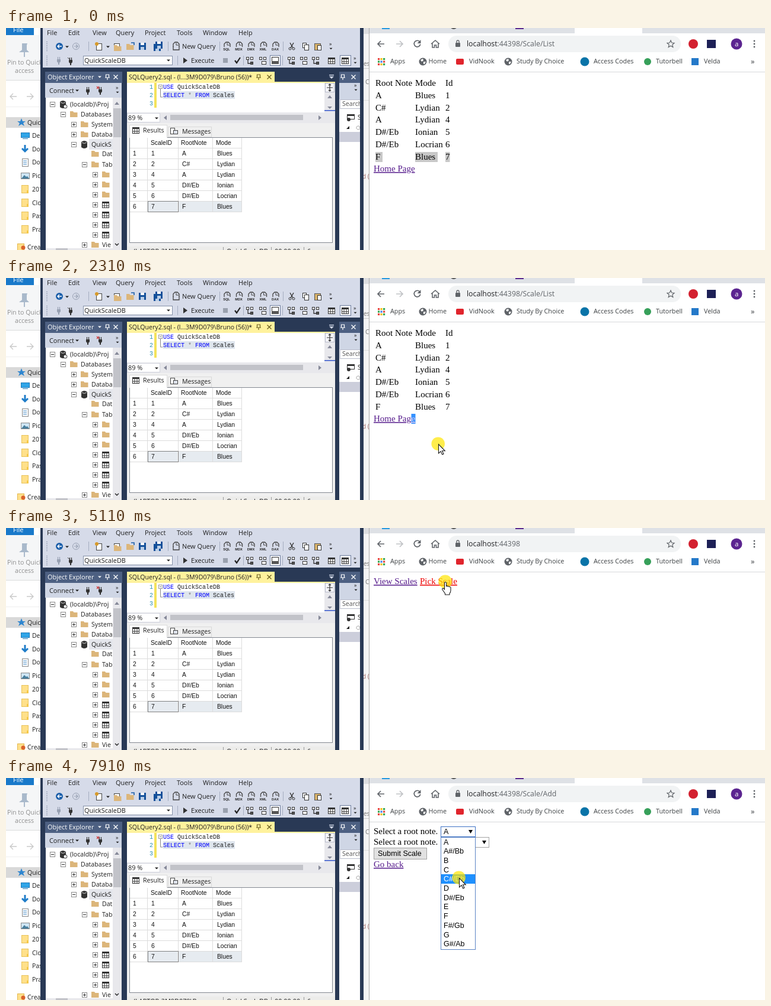
An HTML page that plays this animation: 1280x376 px, repeating every 8 s.

```html
<!DOCTYPE html>
<html lang="en">
<head>
<meta charset="utf-8">
<title>Scale list</title>
<style>
html, body { margin: 0; width: 100%; height: 100%; overflow: hidden; background: #fff; }
svg { display: block; width: 100vw; height: 100vh; }
text { white-space: pre; }
</style>
</head>
<body>
<svg id="stage" viewBox="0 0 1280 376" xmlns="http://www.w3.org/2000/svg"><g id="desk"></g><g id="live"></g></svg>
<script>
const UI = "'Open Sans', sans-serif", ARIAL = "'Liberation Sans', sans-serif";
const TIMES = "'Liberation Serif', serif", MONO = "'Liberation Mono', monospace";
const NAVY = '#293955', BAR = '#d6dbe9', INK = '#1e1e1e', LINK = '#551a8b', BLUE = '#1e90ff';

const rect = (x, y, w, h, fill, more = '') => `<rect x="${x}" y="${y}" width="${w}" height="${h}" fill="${fill}" ${more}/>`;
const box = (x, y, w, h, fill, edge, more = '') => rect(x + .5, y + .5, w - 1, h - 1, fill, `stroke="${edge}" ${more}`);
const disc = (x, y, r, fill, more = '') => `<circle cx="${x}" cy="${y}" r="${r}" fill="${fill}" ${more}/>`;
const fill = (d, c = INK, more = '') => `<path d="${d}" fill="${c}" ${more}/>`;
const line = (d, c = INK, w = 1, more = '') => `<path d="${d}" fill="none" stroke="${c}" stroke-width="${w}" ${more}/>`;
const text = (x, y, s, c = INK, size = 10.9, font = UI, more = '') =>
  `<text x="${x}" y="${y}" fill="${c}" font-size="${size}" font-family="${font}" ${more}>${s}</text>`;
const down = (x, y, c = INK, r = 3) => fill(`M${x - r} ${y - r / 2}h${2 * r}l${-r} ${r}z`, c);
const up = (x, y, c) => fill(`M${x - 4} ${y + 2}h8l-4-5z`, c);
const cross = (x, y, c, r = 3.5, w = 1.4) => line(`M${x - r} ${y - r}l${2 * r} ${2 * r}m0 ${-2 * r}l${-2 * r} ${2 * r}`, c, w);
const folder = (x, y, c = '#dcb67a') => fill(`M${x - 6} ${y - 5}h5l1.5 2h6v8h-12.5z`, c);
const pin = (x, y, c) => line(`M${x - 2.5} ${y - 4}h5v5h-5zM${x - 4} ${y + 1}h8M${x} ${y + 1}v4`, c, 1.2);
const grid = (x, y) => box(x - 6, y - 5, 12, 11, '#fff', '#333') + rect(x - 6, y - 5, 12, 3, '#333') +
  line(`M${x - 6} ${y + 2}h12M${x - 2} ${y - 3}v9M${x + 2} ${y - 3}v9`, '#333');
const plug = (x, y, c = '#333') => fill(`M${x - 3} ${y - 2}h6v4l-2 2v3h-2v-3l-2-2z`, c) + line(`M${x - 1.5} ${y - 6}v4m3-4v4`, c, 1.2);
const more = (x, y) => text(x - 3, y - 1, '»', INK, 9) + down(x, y + 4, INK, 2.5);
const db = (x, y) => fill(`M${x - 5} ${y - 4}q5-4 10 0v9q-5 4-10 0z`, '#333') + line(`M${x - 4} ${y - 3}q4 3 8 0`, '#fff', .8);
// query document, its label in the lower half
const sheet = (x, y, label) => line(`M${x - 4} ${y + 1}v-5l3-3h4l3 3v5`, '#444', 1.3) + line(`M${x + 1} ${y - 6}v4h4`, '#444') +
  (label ? text(x, y + 7, label, '#222', 5.6, ARIAL, 'text-anchor="middle" font-weight="bold"') : line(`M${x - 4} ${y}v6h10v-6`, '#444', 1.3));

function explorer() {
  let s = rect(0, 0, 613, 376, '#fff') + rect(0, 12, 62, 77, '#f5f6f7') + rect(0, 88, 62, 1, '#dadbdc');
  s += rect(0, 0, 47, 12, '#1979ca') + text(12, 7, 'File', '#fff', 11);
  s += fill('M27 26l9 0-1 3 0 8 4 4h-17l5-4v-8z', '#a9b9cb') + line('M31 41v8', '#a9b9cb', 2);
  s += text(2, 62, 'Pin to Quick', '#8f8f8f', 10.6) + text(15, 76, 'access', '#8f8f8f', 10.6);
  s += line('M18 116H7m5-5l-5 5 5 5M35 116h11m-5-5l5 5-5 5', '#c9c9c9', 1.4);
  s += rect(0, 133, 60, 1, '#eee') + rect(0, 151, 60, 18, '#d9d9d9');
  s += fill('M26 153l2 5 5 0-4 3 2 5-5-3-5 3 2-5-4-3 5 0z', '#2f86cf');
  s += text(36, 164, 'Quick access', INK, 10.5);
  s += box(25, 177, 15, 9, '#2fa5e8', '#1b76b8') + rect(28, 187, 9, 1, '#1b76b8');
  s += line('M32 198v11m-5-5l5 5 5-5', '#1e7cc8', 3);
  s += box(27, 221, 11, 14, '#fff', '#888') + line('M29 225h6m-6 3h6m-6 3h6', '#4a8dc8');
  s += box(25, 245, 15, 11, '#cfe6f5', '#888') + fill('M26 255l5-6 3 3 2-1 3 4z', '#4a7f9d');
  ['Desktop', 'Downloads', 'Documents', 'Pictures', '2019', 'Closed', 'Past', 'Practice'].forEach((name, i) => {
    const y = 182 + i * 22.7;
    s += text(44, y + 4, name, INK, 10.4);
    if (i > 3) s += box(26, Math.round(y) - 7, 12, 14, '#ffe08a', '#e8c25a') + rect(35, Math.round(y) + 2, 3, 5, '#f4c84a');
  });
  s += box(19, 365, 12, 13, '#ffe08a', '#e2b64a') + disc(29, 372, 3.5, '#d9622b') + text(36, 375, 'Creative', INK, 10.5);
  // sliver of the window between the two apps
  s += rect(600, 0, 13, 376, '#f4f4f4') + rect(600, 0, 13, 10, '#dcdde0') + rect(603, 68, 10, 1, '#ccc') + rect(603, 122, 10, 1, '#ddd');
  return s + text(603, 64, 'es', '#777', 10) + text(606, 95, 'C', '#777', 10) + text(601, 255, 'd (', '#a06868', 10);
}

function toolbars() {
  let s = rect(58, 0, 545, 376, NAVY) + rect(62, 0, 535, 67, BAR);
  [[69, 'File'], [105, 'Edit'], [146, 'View'], [185, 'Query'], [234, 'Project'], [288, 'Tools'], [332, 'Window'], [392, 'Help']]
    .forEach(([x, w]) => s += text(x, 12, w));
  [139, 273, 360, 467].forEach(x => s += rect(x, 23, 1, 16, '#a5adc0'));
  [289, 400, 466].forEach(x => s += rect(x, 47, 1, 16, '#a5adc0'));
  for (let i = 0; i < 6; i++) s += rect(68, 23 + i * 3, 2, 1, '#8e99b0') + rect(68, 47 + i * 3, 2, 1, '#8e99b0');
  s += disc(90, 31, 6, '#1c5faa') + line('M94 31h-7m3-3l-3 3 3 3', '#fff', 1.4) + down(103, 32);
  s += disc(118, 31, 5.5, 'none', 'stroke="#98a1b3"') + line('M115 31h6m-3-3l3 3-3 3', '#98a1b3', 1.2);
  s += box(152, 26, 10, 12, '#fff', '#444') + disc(153, 27, 3, '#d79b2c') + down(172, 32);
  s += box(182, 26, 10, 11, '#fff', '#444') + folder(188, 34) + folder(209, 32) + line('M211 25h5v4', '#1c5faa', 1.6);
  [[230, 31], [255, 33], [258, 29]].forEach(([x, y]) => s += rect(x - 6, y - 6, 12, 12, '#14509a') + rect(x - 3, y - 6, 6, 4, '#fff') + rect(x - 3, y + 1, 6, 5, '#b9cde6'));
  s += sheet(286, 31) + text(297, 35, 'New Query');
  ['SQL', 'MDX', 'DMX', 'XML', 'DAX'].forEach((w, i) => s += sheet(372 + i * 20.5, 31, w));
  s += line('M479 25l5 9m1-9l-5 9', '#333', 1.4) + disc(479, 35, 2, 'none', 'stroke="#333"') + disc(485, 35, 2, 'none', 'stroke="#333"');
  s += box(500, 25, 7, 9, '#fff', '#333') + box(503, 28, 8, 10, '#fff', '#333');
  s += box(520, 26, 11, 12, '#d9b36c', '#555') + box(525, 29, 7, 9, '#fff', '#333') + more(548, 31);
  s += plug(89, 55, '#98a1b3') + plug(109, 56) + line('M104 50l4 4', '#333');
  s += box(130, 47, 151, 16, '#fff', '#8591a8') + text(132, 59, 'QuickScaleDB') + down(274, 55);
  s += fill('M299 50l7 5-7 5z', '#333') + text(312, 59, 'Execute') + rect(366, 51, 8, 8, '#9aa1ae');
  s += line('M386 55l3 4 6-9', '#222', 2.2);
  s += box(445, 46, 18, 18, '#f7f8fb', '#6f7f9f') + box(563, 46, 19, 18, '#f7f8fb', '#6f7f9f');
  [411, 433, 481, 502, 522].forEach((x, i) => {
    s += box(x - 6, 49, 5, 5, '#fff', '#333') + box(x + 1, 49, 5, 5, '#fff', '#333');
    s += i % 2 ? box(x - 2, 56, 8, 6, '#fff', '#333') : line(`M${x - 3} 54v6h6`, '#333', 1.3) + box(x + 1, 57, 5, 5, '#555', '#333');
  });
  s += box(448, 49, 12, 12, '#fff', '#333') + rect(448, 56, 12, 5, '#555');
  s += grid(549, 55) + grid(572, 55);
  return s + more(589, 55);
}

function objects() {
  let s = rect(66, 74, 130, 19, '#4d6082') + text(70, 87, 'Object Explorer', '#fff') + down(158, 83, '#fff') + pin(171, 83, '#fff') + cross(185, 83, '#fff');
  s += rect(66, 93, 130, 25, '#cfd6e5') + text(73, 110, 'Connect') + down(120, 106) + plug(138, 106) + plug(159, 106) + cross(155, 101, '#c33', 2, 1.2) + more(188, 105);
  s += rect(67, 118, 128, 258, '#fff') + rect(140, 188, 41, 18, '#e4e6ec');
  const sign = (x, y, open) => box(x - 4, y - 4, 9, 9, '#fff', '#8a8a8a') + line(`M${x - 2} ${y + .5}h5` + (open ? '' : `M${x + .5} ${y - 2}v5`), '#333');
  // x of the sign, y, state, icon, label
  const row = (x, y, state, icon, label = '') => (state ? sign(x, y, state === '-') : '') + icon(x + 18, y) + text(x + 30, y + 4, label, INK, 10.6);
  s += row(78, 129, '-', (x, y) => db(x, y) + disc(x + 4, y + 4, 3, '#fff', 'stroke="#333"'), '(localdb)\\Proj');
  s += row(96, 146, '-', folder, 'Databases') + row(114, 163, '+', folder, 'System') + row(114, 180, '+', folder, 'Databas');
  s += row(114, 197, '-', db, 'QuickS') + row(132, 213, '', folder, 'Dat') + row(132, 231, '-', folder, 'Tab');
  for (let i = 0; i < 7; i++) s += row(150, 248 + i * 17, '+', i < 3 ? folder : grid);
  s += row(132, 367, '+', folder, 'Vie');
  s += rect(180, 118, 15, 258, '#e8e8ec') + rect(181, 136, 13, 49, '#c2c3c9') + up(187, 128, '#868999') + line('M184 365l3 3 3-3', '#222', 1.4);
  return s + rect(67, 373, 113, 3, '#e8e8ec') + rect(84, 373, 20, 3, '#c2c3c9') + rect(195, 93, 9, 283, NAVY);
}

function editor() {
  let s = rect(204, 74, 249, 18, '#fff29d') + rect(204, 91, 351, 2, '#fff29d');
  s += text(207, 87, 'SQLQuery2.sql - (l...3M9D079\\Bruno (56))*', INK, 10.6) + pin(426, 83, '#6b5f20') + cross(444, 83, '#6b5f20');
  s += rect(545, 79, 8, 1.5, '#cfd6e5') + down(549, 84, '#cfd6e5', 4);
  s += rect(204, 93, 351, 50, '#fff') + rect(250, 93, 4, 42, '#f4e35a') + rect(265, 107, 121, 13, '#dfe6ee');
  ['1', '2', '3'].forEach((n, i) => s += text(242, 103 + i * 14, n, '#2b91af', 10, MONO));
  const word = w => `<tspan fill="#0000ff">${w}</tspan>`;
  s += box(257, 96, 7, 7, '#fff', '#999') + line('M259 99.5h3M260.5 103v14h4', '#888');
  s += text(265, 103, word('USE') + ' QuickScaleDB', INK, 10, MONO);
  s += text(265, 117, word('SELECT') + ' <tspan fill="#777">*</tspan> ' + word('FROM') + ' Scales', INK, 10, MONO);
  s += rect(537, 93, 18, 50, '#e8e8ec') + box(538, 93, 16, 16, '#f5f5f8', '#b8bccb') + line('M541 101h10M546 95v12m-2-10l2-2 2 2m-4 8l2 2 2-2', '#333', 1.2);
  s += up(546, 117, '#868999') + down(546, 135, '#868999', 4) + rect(537, 139, 18, 1.5, '#3355cc');
  s += rect(204, 143, 351, 18, '#e8e8ec') + box(204, 144, 56, 16, '#fff', '#d0d3dd') + text(206, 156, '89 %') + down(254, 153);
  s += rect(277, 147, 224, 9, '#c2c3c9') + fill('M271 148v8l-5-4zM527 148v8l5-4z', '#868999');
  s += rect(204, 161, 351, 209, '#f0f0f0') + box(208, 185, 343, 179, '#fff', '#828790');
  s += box(273, 167, 74, 18, '#f0f0f0', '#d9d9d9') + box(208, 164, 64, 22, '#fff', '#d9d9d9') + rect(209, 184, 62, 3, '#fff');
  s += grid(219, 173) + text(231, 177, 'Results', INK, 10.6);
  s += box(277, 169, 8, 11, '#fff', '#444') + box(282, 173, 8, 7, '#dfe4ee', '#444') + text(297, 179, 'Messages', INK, 10.6);
  s += rect(290, 293, 107, 18, '#e6ebf0') + rect(239, 294, 50, 17, '#e6ebf0');
  for (let i = 0; i < 7; i++) s += rect(209, 203 + i * 18, 188, 1, '#dcdcdc');
  [238, 290, 348, 397].forEach(x => s += rect(x, 186, 1, 126, '#dcdcdc'));
  const cell = (x, y, w) => text(x, y, w, '#111', 10.3, ARIAL);
  s += cell(244, 198, 'ScaleID') + cell(295, 198, 'RootNote') + cell(354, 198, 'Mode');
  scales.forEach(([note, mode, id], i) => {
    const y = 216 + i * 18;
    s += cell(214, y, i + 1) + cell(245, y, id) + cell(297, y, note) + cell(356, y, mode);
  });
  s += box(239, 293, 52, 19, 'none', '#222', 'stroke-dasharray="1 1"');
  s += rect(204, 370, 351, 6, '#ececea');
  ['215 (LAPTOP-3M9D079\\Bruno', '372 QuickScaleDB', '453 00:00:00', '508 6 rows'].forEach(v => s += text(v.slice(0, 3), 382, v.slice(4)));
  [366, 447, 502].forEach(x => s += rect(x, 371, 1, 5, '#999'));
  return s;
}

function sidePanel() {
  let s = rect(562, 74, 35, 19, '#4d6082') + pin(568, 83, '#fff') + cross(586, 83, '#fff');
  s += rect(562, 93, 35, 28, '#cfd6e5') + more(590, 101);
  s += rect(562, 121, 35, 255, '#fff') + box(563, 121, 36, 16, '#fff', '#b8bccb') + text(567, 132, 'Search', '#555', 10.6);
  s += box(575, 146, 13, 9, '#fff', '#333') + rect(575, 146, 13, 3, '#333') + disc(578, 155, 3, '#333') + text(593, 155, 'S', INK, 10.6);
  s += fill('M579 166v5h-5z') + disc(594, 169, 3, 'none', 'stroke="#444" stroke-dasharray="1 1"') + rect(562, 176, 35, 17, '#cccedb');
  return s + rect(597, 0, 6, 376, NAVY);
}

function browser() {
  let s = rect(612, 0, 668, 376, '#fff') + rect(613, 0, 667, 9, '#dee1e6') + rect(959, 0, 114, 10, '#fff');
  s += rect(634, 0, 13, 2, '#2a9be0') + disc(755, -4, 6, '#555') + rect(859, 0, 14, 2, '#5c2d91') + rect(612, 0, 1, 376, '#a8a8a8');
  s += line('M638 27h-11m5-5l-5 5 5 5', '#5f6368', 1.7) + line('M658 27h11m-5-5l5 5-5 5', '#c0c2c5', 1.7);
  s += line('M717 27l7-6 7 6m-12-1v7h3.500v-4h3v4h3.500v-7', '#5f6368', 1.6);
  s += rect(746, 13, 392, 28, '#f1f3f4', 'rx="14"') + rect(758, 25, 8, 7, '#5f6368', 'rx="1"') + line('M760 25v-2a2 2 0 0 1 4 0v2', '#5f6368', 1.3);
  s += line('M1121 21l1.8 4 4.2.4-3.2 2.9 1 4.2-3.8-2.3-3.8 2.3 1-4.2-3.2-2.9 4.2-.4z', '#5f6368', 1.2);
  s += disc(1159, 27, 8, '#d3202f') + rect(1182, 20, 15, 14, '#1d2056') + disc(1232, 27, 9.5, '#5b2490') + text(1229, 31, 'a', '#fff', 11.5);
  [22, 27, 32].forEach(y => s += disc(1262, y, 1.4, '#5f6368'));
  const tint = ['#e8453c', '#4285f4', '#34a853', '#fbbc05'];
  for (let i = 0; i < 9; i++) s += rect(627 + i % 3 * 4.5, 51 + (i / 3 | 0) * 4.5, 3.2, 3.2, tint[(i * 3 + (i / 3 | 0)) % 4]);
  const globe = x => disc(x, 57, 6.5, '#5f6368') + fill(`M${x - 4} 54l4-2 1 3-3 2zM${x + 1} 57l4 0-2 4-2 0z`, '#fff');
  s += globe(703) + globe(847) + rect(759, 52, 13, 10, '#e0242c', 'rx="2"') + disc(976, 57, 7.5, '#0a74a8') + disc(1082, 57, 6, '#37a05a') + rect(1156, 51, 12, 12, '#2479c9');
  [[648, 'Apps'], [712.5, 'Home'], [781, 'VidNook'], [861, 'Study By Choice'], [991, 'Access Codes'], [1096, 'Tutorbell'], [1177, 'Velda']]
    .forEach(([x, w]) => s += text(x, 60, w, '#3c4043', 10.8));
  return s + text(1256, 61, '»', '#3c4043', 13) + rect(613, 74, 667, 1, '#d6d8db');
}

const scales = [['A', 'Blues', 1], ['C#', 'Lydian', 2], ['A', 'Lydian', 4], ['D#/Eb', 'Ionian', 5], ['D#/Eb', 'Locrian', 6], ['F', 'Blues', 7]];
const notes = ['A', 'A#/Bb', 'B', 'C', 'C#/Db', 'D', 'D#/Eb', 'E', 'F', 'F#/Gb', 'G', 'G#/Ab'];
// start, end, steps, from x y, to x y
const moves = [
  [610, 920, 5, 1090, 335, 890, 289], [1150, 1850, 10, 722, 235, 803, 293],
  [2010, 2160, 3, 770, 277, 683, 242], [2240, 2310, 2, 705, 262, 729, 281],
  [2780, 3240, 7, 721, 276, 652, 239], [4030, 4420, 6, 661, 222, 730, 115],
  [4490, 4880, 6, 733, 109, 741, 91], [5730, 5730, 1, 728, 99, 728, 99],
  [5800, 6190, 6, 732, 98, 753, 98], [6820, 7210, 6, 750, 111, 759, 161],
  [7610, 7760, 3, 761, 164, 764, 169]
];
const presses = [[1850, 2400], [3410, 3560], [5110, 5260], [6420, 6500], [7910, 8000]];
const during = (t, spans) => spans.some(([a, b]) => t >= a && t < b);

function tip(t) {
  const m = moves.filter(v => t >= v[0]).pop();
  if (!m) return null;
  const [a, b, n, x0, y0, x1, y1] = m;
  const k = n > 1 ? Math.min(n - 1, Math.floor((t - a) / (b - a) * (n - 1) + 1e-6)) / (n - 1) : 1;
  return [x0 + (x1 - x0) * k, y0 + (y1 - y0) * k];
}

const serif = (x, y, s, c = '#000', more = '') => text(x, y, s, c, 15, TIMES, more);
const link = (x, y, s, active) => serif(x, y, s, active ? '#ee0000' : LINK, 'text-decoration="underline"');
const sans = (x, y, s, c = '#000') => text(x, y, s, c, 12.5, ARIAL);

function listPage(t) {
  let s = '';
  if (t < 1850) [[623, 12], [690, 38], [741, 7.5]].forEach(([x, w]) => s += rect(x, 210, w, 17, '#c8c8c8'));
  [['Root Note', 'Mode', 'Id'], ...scales].forEach((r, i) => r.forEach((v, j) => s += serif([623, 690, 741][j], 98 + i * 20.8, v)));
  s += link(620, 243, 'Home Page', t >= 3410);
  if (t >= 2160 && t < 3410) s += rect(683.5, 230, 7, 17, '#3390ff') + link(683.5, 243, 'e').replace(LINK, '#d9c8f0');
  return s;
}

const homePage = t => link(620, 95, 'View Scales') + link(698, 95, 'Pick Scale', t >= 5110);

function addPage(t, at) {
  const open = t >= 6420;
  const select = (y, w, v, edge) => box(733, y, w, 18, '#fff', edge) + sans(738, y + 13, v) + fill(`M${733 + w - 12} ${y + 6}h7l-3.5 6z`, '#000');
  let s = serif(620, 95, 'Select a root note.') + serif(620, 113, 'Select a root note.');
  s += select(82, 59, 'A', open ? '#3b70c4' : '#a3a3a3') + select(100, 82, 'Lydian', '#a3a3a3');
  s += box(620, 118, 90, 20, '#e1e1e1', '#a3a3a3') + sans(627, 132, 'Submit Scale') + link(620, 151, 'Go back');
  if (!open) return s;
  const pick = t < 6820 ? 0 : Math.floor((at[1] - 100.5) / 15.7);
  s += box(733, 100, 59, 191, '#fff', '#5b84c4');
  notes.forEach((n, i) => {
    const y = Math.round(100.5 + i * 15.7);
    if (i === pick) s += rect(734, y, 57, 16, BLUE);
    s += sans(738, y + 12, n, i === pick ? '#fff' : '#000');
  });
  return s;
}

function pointer(t, at) {
  if (!at) return '';
  const hand = during(t, [[3240, 4030], [4724, 5730]]);
  const shape = hand
    ? 'M-1.5 1.5q1.5-2 3 0v6q1.5-1 2.5.5 1.5-.8 2.5.7 1.8-.6 2.5 1v5q0 3-2 5.300v2h-7.500v-2l-4.500-6.500q-1-2.500 1.500-2.500l2 2z'
    : 'M.5.5v15.500l3.600-3.400 2.600 5.400 2.300-1-2.500-5.200h4.800z';
  const halo = during(t, presses) ? disc(at[0] - .3, at[1] - .3, 11.3, '#ffe600', 'opacity=".7"') : '';
  return halo + fill(shape, '#fff', `stroke="#1a1a1a" stroke-width="1.1" transform="translate(${at[0]} ${at[1]})"`);
}

function scene(t) {
  const at = tip(t);
  const [path, page] = t < 3560 ? ['/Scale/List', listPage] : t < 5260 ? ['', homePage] : ['/Scale/Add', addPage];
  const busy = during(t, [[3560, 3800], [5260, 5350]]);
  let s = text(777, 31, 'localhost<tspan fill="#5f6368">:44398' + path + '</tspan>', '#202124', 12.3);
  s += busy ? cross(693.5, 26.5, '#5f6368', 4.5, 1.7)
    : line('M697.5 23a5.300 5.300 0 1 0 1.300 4.500', '#5f6368', 1.7) + fill('M699.500 20v6h-6z', '#5f6368');
  return s + page(t, at) + pointer(t, at);
}

document.getElementById('desk').innerHTML = explorer() + toolbars() + objects() + editor() + sidePanel() + browser();
const live = document.getElementById('live');
const start = performance.now();
let shown = '';
function draw() {
  const next = scene((performance.now() - start) % 8000);
  if (next !== shown) live.innerHTML = shown = next;
  requestAnimationFrame(draw);
}
draw();
</script>
</body>
</html>
```
